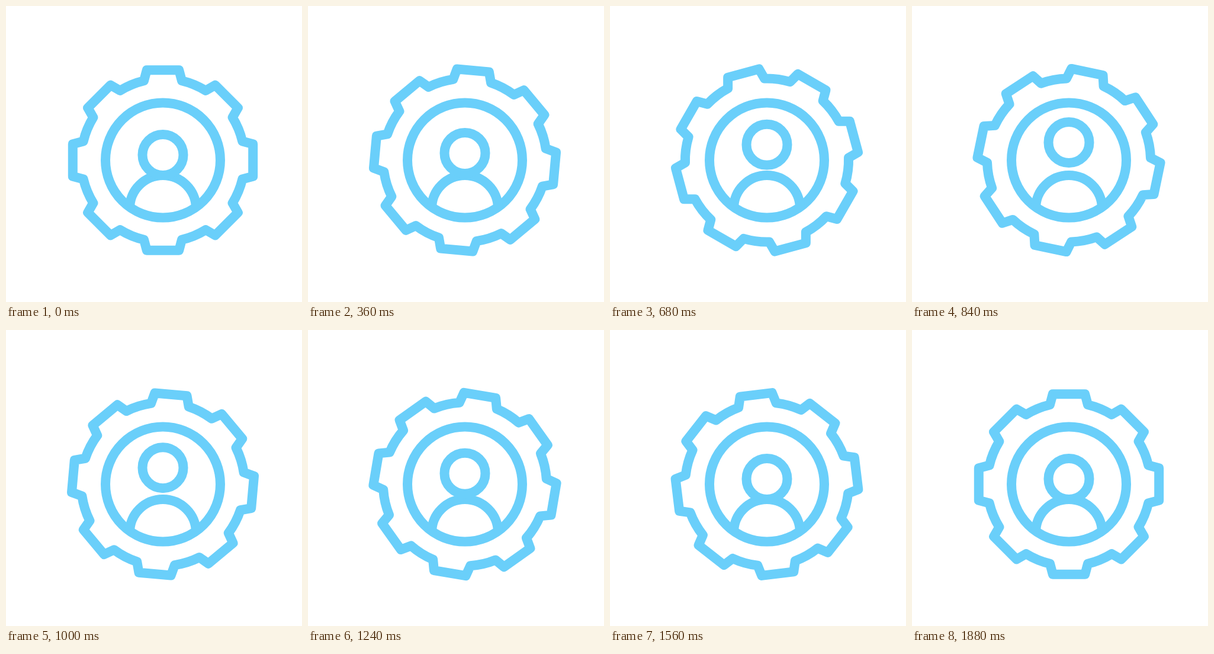
Animation, 500 px wide and 500 px high, one loop 2000 ms. Source, as an HTML page:

```html
<!DOCTYPE html>
<html lang="en">
<head>
<meta charset="utf-8">
<title>Profile gear</title>
<style>
  html, body { margin: 0; width: 100%; height: 100%; overflow: hidden; background: #fff; }
  svg { display: block; width: 100vw; height: 100vh; }
</style>
</head>
<body>
<svg viewBox="0 0 500 500">
  <g transform="translate(265 260.5)" fill="none" stroke="#6acffa" stroke-width="16" stroke-linejoin="round">
    <path id="gear"/>
    <circle r="97"/>
    <path d="M-56 81.5a56 56 0 0 1 112 0"/>
    <circle id="head" r="34.5"/>
  </g>
</svg>
<script>
const LOOP = 2000, STEP = 40;
const gear = document.getElementById('gear');
const head = document.getElementById('head');

// One tooth, repeated eight times and joined by arcs
const tooth = [[-32, -134.3], [-27.2, -152.2], [27.2, -152.2], [32, -134.3]];
const rootRadius = Math.hypot(...tooth[0]);

function gearPath() {
  let d = '';
  for (let i = 0; i < 8; i++) {
    const c = Math.cos(i * Math.PI / 4), s = Math.sin(i * Math.PI / 4);
    tooth.forEach(([x, y], k) => {
      const join = k ? 'L' : i ? `A${rootRadius} ${rootRadius} 0 0 1 ` : 'M';
      d += join + (x * c - y * s).toFixed(2) + ' ' + (x * s + y * c).toFixed(2);
    });
  }
  const [x, y] = tooth[0];
  return d + `A${rootRadius} ${rootRadius} 0 0 1 ${x} ${y}Z`;
}

const progress = (t, from, to) => Math.min(1, Math.max(0, (t - from) / (to - from)));
const smooth = p => p * p * (3 - 2 * p);

// Symmetric cubic-bezier(a, 0, 1 - a, 1)
function bezierEase(p, a) {
  let lo = 0, hi = 1;
  for (let i = 0; i < 30; i++) {
    const u = (lo + hi) / 2, v = 1 - u;
    const x = 3 * u * v * (v * a + u * (1 - a)) + u ** 3;
    if (x < p) lo = u; else hi = u;
  }
  return smooth(lo);
}

function draw(now) {
  const t = Math.floor(now % LOOP / STEP) * STEP;
  const angle = 180 * bezierEase(progress(t, 60, 1900), 0.615);
  const lift = 21 * (smooth(progress(t, 200, 860)) - smooth(progress(t, 860, 1568)));
  gear.setAttribute('transform', `rotate(${angle.toFixed(3)})`);
  head.setAttribute('cy', (-9 - lift).toFixed(2));
}

gear.setAttribute('d', gearPath());
const start = performance.now();
function tick() {
  draw(performance.now() - start);
  requestAnimationFrame(tick);
}
tick();
</script>
</body>
</html>
```
